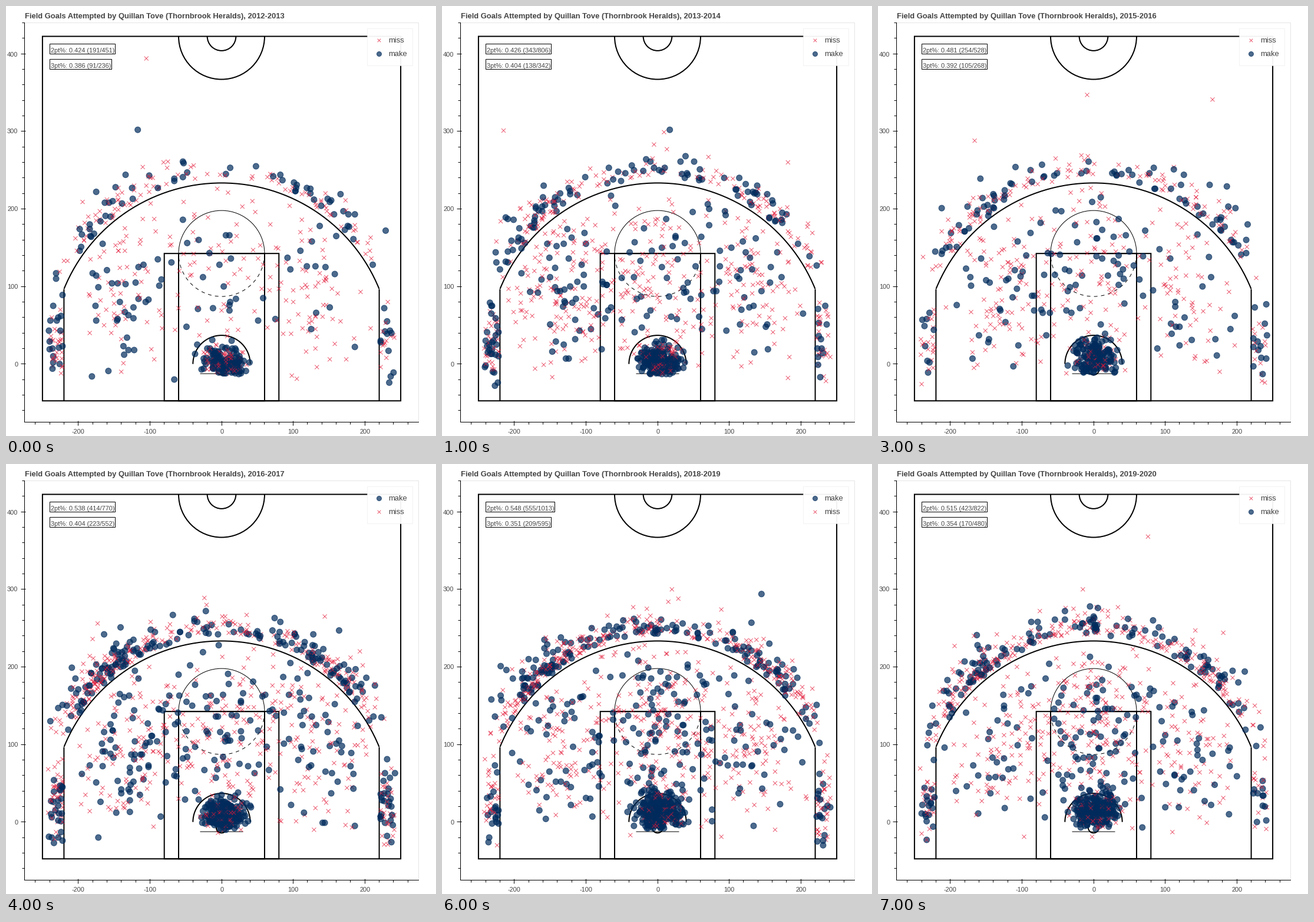
A matplotlib script for the animation above (9 s loop, 730 by 730 pixels).

```python
import numpy as np
import matplotlib.pyplot as plt
from matplotlib.animation import FuncAnimation
from matplotlib.collections import PathCollection
from matplotlib.patches import Arc, Rectangle
from matplotlib.path import Path
from matplotlib.transforms import IdentityTransform

SIZE, DPI = 730, 100
PX = 72 / DPI                          # one pixel in points
LEFT, TOP, WIDTH, HEIGHT = 31.5, 28.5, 669, 678
SX, SY = WIDTH / 550, HEIGHT / 515     # pixels per court unit
GREY = "#444444"
NAVY = (0, 43 / 255, 92 / 255, 0.7)
RED = (227 / 255, 24 / 255, 55 / 255, 0.7)
CLEAR = (0, 0, 0, 0)
PLAYER, TEAM = "Quillan Tove", "Thornbrook Heralds"

plt.rcParams["font.family"] = "Liberation Sans"
plt.rcParams["path.snap"] = False

# Made and tried shots per season: two-pointers, three-pointers
FIRST_YEAR = 2012
TOTALS = ["191/451 91/236", "343/806 138/342", "259/598 106/259",
          "254/528 105/268", "414/770 223/552", "484/954 199/528",
          "555/1013 209/595", "423/822 170/480"]
MAKE_FIRST = {2016, 2018}              # legend order

# Shots from far out: x, y, made
FAR = {2012: [(-105, 394, 0), (-117, 302, 1)],
       2013: [(-215, 301, 0), (9, 299, 0), (17, 302, 1)],
       2015: [(-9, 347, 0), (166, 341, 0), (-166, 288, 0)],
       2017: [(-194, 418, 0), (176, 311, 0)],
       2018: [(145, 294, 1), (20, 300, 0)],
       2019: [(76, 368, 0), (-15, 300, 0)]}

RIM_ODDS = 2.2                         # shots at the rim go in more often


def lerp(a, b, t):
    return a + (b - a) * t


def to_px(x, y):
    return LEFT + (x + 275) * SX, TOP + (440 - y) * SY


def pick(rng, draw, ok):
    """Redraw until the spot is allowed."""
    while True:
        x, y = draw(rng)
        if ok(x, y):
            return x, y


def rim(rng, t):
    cy = lerp(2, 14, t)
    return pick(rng, lambda g: (g.normal(3, 14), g.normal(cy, 11)),
                lambda x, y: y > cy / 2 - 15)


def mid_range(rng, t):
    """Close to the lane in late seasons, out on both wings in early ones."""
    wing = rng.random() < lerp(0.7, 0.42, t)
    side = rng.choice([-1, 1], p=[0.56, 0.44])

    def draw(g):
        if wing:
            return side * g.normal(135, 38), g.normal(100, 62)
        return g.normal(0, 48), g.normal(120, 58)

    return pick(rng, draw, lambda x, y: np.hypot(x, y) < 230
                and abs(x) < 212 and y > -20)


def corner(rng):
    side = rng.choice([-1, 1], p=[0.56, 0.44])
    return pick(rng, lambda g: (side * (222 + 20 * g.random() ** 1.3),
                                g.normal(25, 28)),
                lambda x, y: -30 < y < 92)


def arc_shot(rng, t):
    """Just behind the line, mostly from the two wings."""
    shares = [0.45, lerp(0.17, 0.24, t), 0]
    shares[2] = 1 - sum(shares)
    mean, spread = [(130, 12), (90, 13), (53, 12)][rng.choice(3, p=shares)]

    def draw(g):
        a = np.radians(g.normal(mean, spread))
        r = 241 + g.gamma(1.8, 7.5)
        return r * np.cos(a), r * np.sin(a)

    return pick(rng, draw, lambda x, y: y > 96 and abs(x) < 240)


class Season:
    def __init__(self, index):
        year = FIRST_YEAR + index
        t = index / (len(TOTALS) - 1)
        rng = np.random.default_rng(year)
        self.label = f"{year}-{year + 1}"
        self.make_first = year in MAKE_FIRST
        self.lines, shots = [], []
        for points, score in zip((2, 3), TOTALS[index].split()):
            made, tried = map(int, score.split("/"))
            self.lines.append(f"{points}pt%: {made / tried:.3f} ({score})")
            far = FAR.get(year, []) if points == 3 else []
            made -= sum(hit for *_, hit in far)
            spots, luck = [], []
            for _ in range(tried - len(far)):
                spot, odds = self.shoot(rng, points, t)
                spots.append(spot)
                luck.append(rng.random() / odds)
            rank = np.argsort(np.argsort(luck))
            shots += [(*s, r < made) for s, r in zip(spots, rank)] + far
        rng.shuffle(shots)
        x, y, hits = np.array(shots, float).T
        self.spots = np.column_stack(to_px(x.round(), y.round()))
        self.hits = hits > 0

    @staticmethod
    def shoot(rng, points, t):
        u = rng.random()
        if points == 3:
            return (corner(rng) if u < lerp(0.3, 0.14, t) else arc_shot(rng, t)), 1
        return (rim(rng, t), RIM_ODDS) if u < 0.42 else (mid_range(rng, t), 1)


SEASONS = [Season(i) for i in range(len(TOTALS))]

fig = plt.figure(figsize=(SIZE / DPI, SIZE / DPI), dpi=DPI, facecolor="white")
ax = fig.add_axes([0, 0, 1, 1])
ax.set(xlim=(0, SIZE), ylim=(SIZE, 0))
ax.axis("off")


def line(x0, y0, x1, y1, width=1):
    ax.plot([x0, x1], [y0, y1], color="black", lw=width * PX,
            solid_capstyle="butt", zorder=1)


def court_line(x0, y0, x1, y1, width=2):
    line(*to_px(x0, y0), *to_px(x1, y1), width)


def box(x, y, w, h, z, width=1, **kw):
    return ax.add_patch(Rectangle((x, y), w, h, lw=width * PX, zorder=z, **kw))


def court_box(half, top):
    x, y = to_px(-half, top)
    box(x, y, 2 * half * SX, (top + 47.5) * SY, 1, 2, fill=False)


def arc(y, radius, start, stop, width=2, style="-"):
    """Circular arc on the middle line; angles run clockwise on screen."""
    d = 2 * radius * SX
    ax.add_patch(Arc(to_px(0, y), d, d, theta1=start, theta2=stop,
                     lw=width * PX, ls=style, zorder=1))


def label(x, y, text="", size=11, **kw):
    return ax.text(x, y, text, fontsize=size * PX, color=GREY,
                   va="baseline", zorder=6, **kw)


def draw_axes():
    right, bottom = LEFT + WIDTH, TOP + HEIGHT
    box(LEFT, TOP, WIDTH, HEIGHT, 0, fill=False, ec="#e5e5e5")
    line(LEFT, TOP - 0.5, LEFT, bottom + 0.5)
    line(LEFT - 0.5, bottom, right + 0.5, bottom)
    for v in range(-260, 441, 20):
        major = v % 100 == 0
        inner, outer = (2, 6) if major else (0, 4)
        x, y = (np.floor(p) + 0.5 for p in to_px(v, v))
        if v <= 260:
            line(x, bottom - inner, x, bottom + outer)
            if major:
                label(x, 726, str(v), ha="center")
        if v >= -60:
            line(LEFT - outer, y, LEFT + inner, y)
            if major:
                label(20.5, y + 4, str(v), ha="right")


def draw_court():
    court_box(250, 422.5)
    court_box(80, 142.5)
    court_box(60, 142.5)
    for x in (-220, 220):
        court_line(x, -47.5, x, 96.5)
    court_line(-30, -12.5, 30, -12.5, 1)
    arc(422.5, 60, 0, 180)
    arc(422.5, 20, 0, 180)
    arc(142.5, 60, 180, 360, 1)
    arc(142.5, 60, 0, 180, 1, (0, (6, 6)))
    arc(0, 40, 180, 360)
    arc(-7.2, 7.5, 0, 360)
    arc(14, 237.5, 202.2, 337.8)


class Markers:
    """Discs for makes and crosses for misses, in drawing order."""

    def __init__(self, radius, arm, z):
        self.disc = Path.circle((0, 0), radius)
        self.cross = Path([(-arm, -arm), (arm, arm), (-arm, arm), (arm, -arm)],
                          [Path.MOVETO, Path.LINETO] * 2)
        self.marks = PathCollection([self.disc], offsets=[(0, 0)],
                                    offset_transform=ax.transData,
                                    linewidths=PX, zorder=z)
        self.marks.set_transform(IdentityTransform())
        ax.add_collection(self.marks, autolim=False)

    def show(self, spots, hits):
        self.marks.set_paths([self.disc if h else self.cross for h in hits])
        self.marks.set_offsets(spots)
        self.marks.set_facecolor([NAVY if h else CLEAR for h in hits])
        self.marks.set_edgecolor([NAVY if h else RED for h in hits])


draw_axes()
draw_court()
shots = Markers(5, 3.5, 2)
box(613.5, 38.5, 77, 63, 4, fc=(1, 1, 1, 0.95), ec=(0.9, 0.9, 0.9, 0.5))
keys = Markers(4, 2.8, 5)
key_texts = [label(649.5, y, size=13) for y in (62, 85)]
title = label(31.5, 20.5, size=13, weight="bold")
frames, stats = [], []
for bottom in (81.5, 107.5):
    frames.append(box(74.5, bottom - 17, 111, 17, 5, fc="white", ec="black"))
    stats.append(label(76.5, bottom - 2.5))


def draw(i):
    s = SEASONS[min(i, len(SEASONS) - 1)]
    shots.show(s.spots, s.hits)
    order = (s.make_first, not s.make_first)
    keys.show([(633.5, 58.5), (633.5, 81.5)], order)
    for text, hit in zip(key_texts, order):
        text.set_text("make" if hit else "miss")
    title.set_text(f"Field Goals Attempted by {PLAYER} ({TEAM}), {s.label}")
    for frame, text, words in zip(frames, stats, s.lines):
        text.set_text(words)
        frame.set_width(111 + 6 * (len(words) - 21))
    return []


# The last season stays for two beats
anim = FuncAnimation(fig, draw, frames=len(SEASONS) + 1, interval=1000,
                     init_func=lambda: draw(0), repeat=True, repeat_delay=0,
                     blit=False)
plt.show()
```
